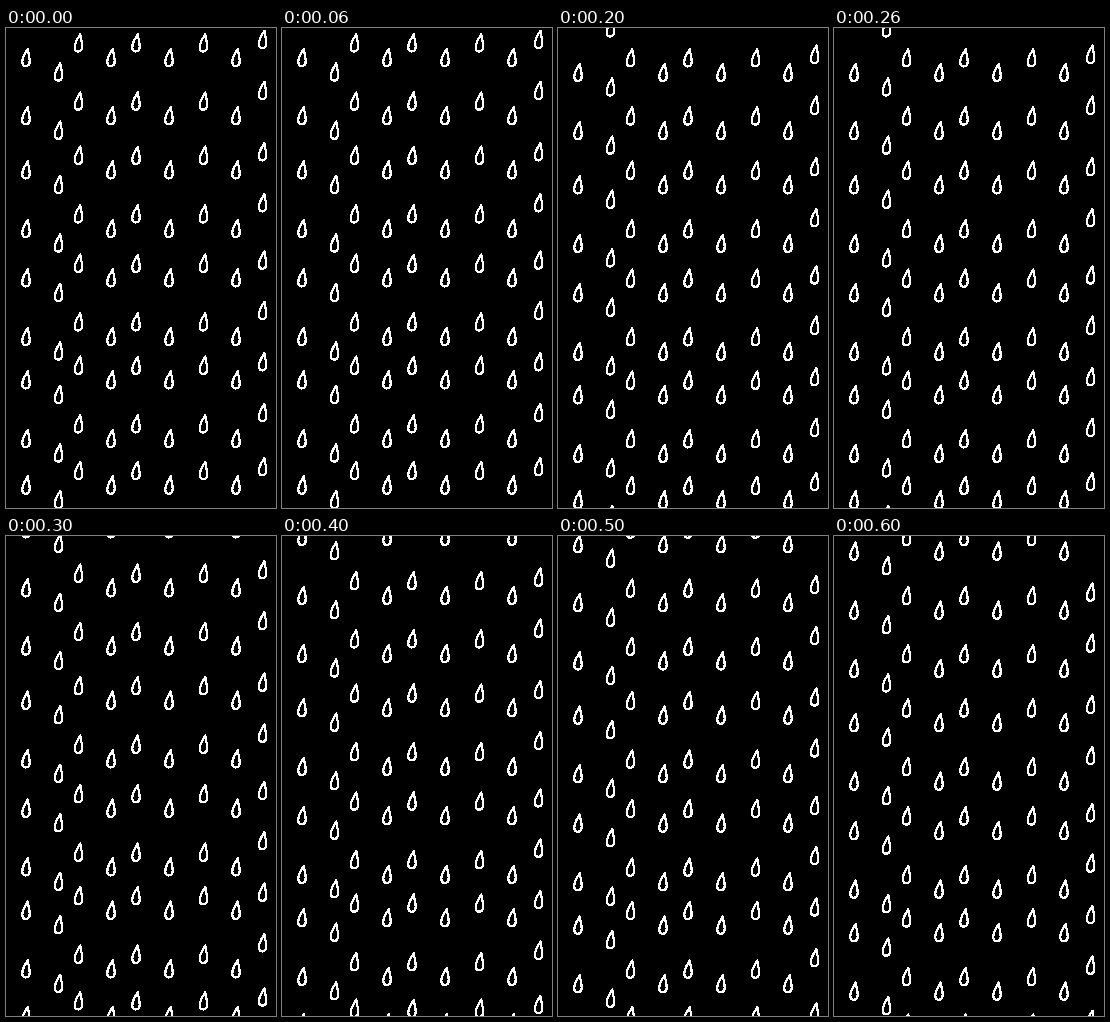
An HTML page that plays this animation: 270 px wide and 480 px high, repeating every 0.7 s.

```html
<!DOCTYPE html>
<html lang="en">
<head>
<meta charset="utf-8">
<title>Falling drops</title>
<style>
  html, body { margin: 0; width: 100%; height: 100%; overflow: hidden; background: #000; }
  svg { display: block; width: 100vw; height: 100vh; }
</style>
</head>
<body>
<svg id="stage" viewBox="0 0 270 480">
  <defs>
    <path id="drop" d="M1.8 -8.6 C0 -5.2 -3.7 -1 -3.7 4.4 C-3.7 7.4 -2.3 8.7 -0.3 8.7 C2.3 8.7 3.7 6.6 3.7 3.6 C3.7 -0.6 2.1 -4.4 1.8 -8.6 Z"
      fill="none" stroke="#fff" stroke-width="2.3" stroke-linejoin="round" shape-rendering="crispEdges"/>
  </defs>
</svg>
<script>
const SVG_NS = 'http://www.w3.org/2000/svg';
const LOOP = 700;
const STEP = 100;
const FALL_PER_STEP = 7.45;

const rows = [-29.6, 29.4, 87.6, 141.8, 200.4, 249.8, 308.4, 351.8, 410.4, 457];
const edgeRows = [11.3, 62.3, 123.7, 174.7, 232, 282.3, 333.7, 384.4, 438.6, 489.4];
const shifted = dy => rows.map(y => y + dy);
const high = shifted(-14.6);
const low = shifted(14.5);

const columns = [
  [20, rows], [52.5, low], [72.5, high], [105, rows], [130, high],
  [163, rows], [197.5, high], [230, rows], [256.6, edgeRows]
];

const stage = document.getElementById('stage');
const drops = columns.flatMap(([x, ys]) => ys.map(y => {
  const node = document.createElementNS(SVG_NS, 'use');
  node.setAttribute('href', '#drop');
  stage.append(node);
  return { node, x, y };
}));

// The fall advances in held steps and jumps back at the end of each loop.
function draw(time) {
  const fall = Math.floor((time % LOOP) / STEP) * FALL_PER_STEP;
  for (const { node, x, y } of drops) {
    node.setAttribute('transform', `translate(${x} ${y + fall})`);
  }
}

const start = performance.now();
function tick() {
  draw(performance.now() - start);
  requestAnimationFrame(tick);
}
tick();
</script>
</body>
</html>
```
